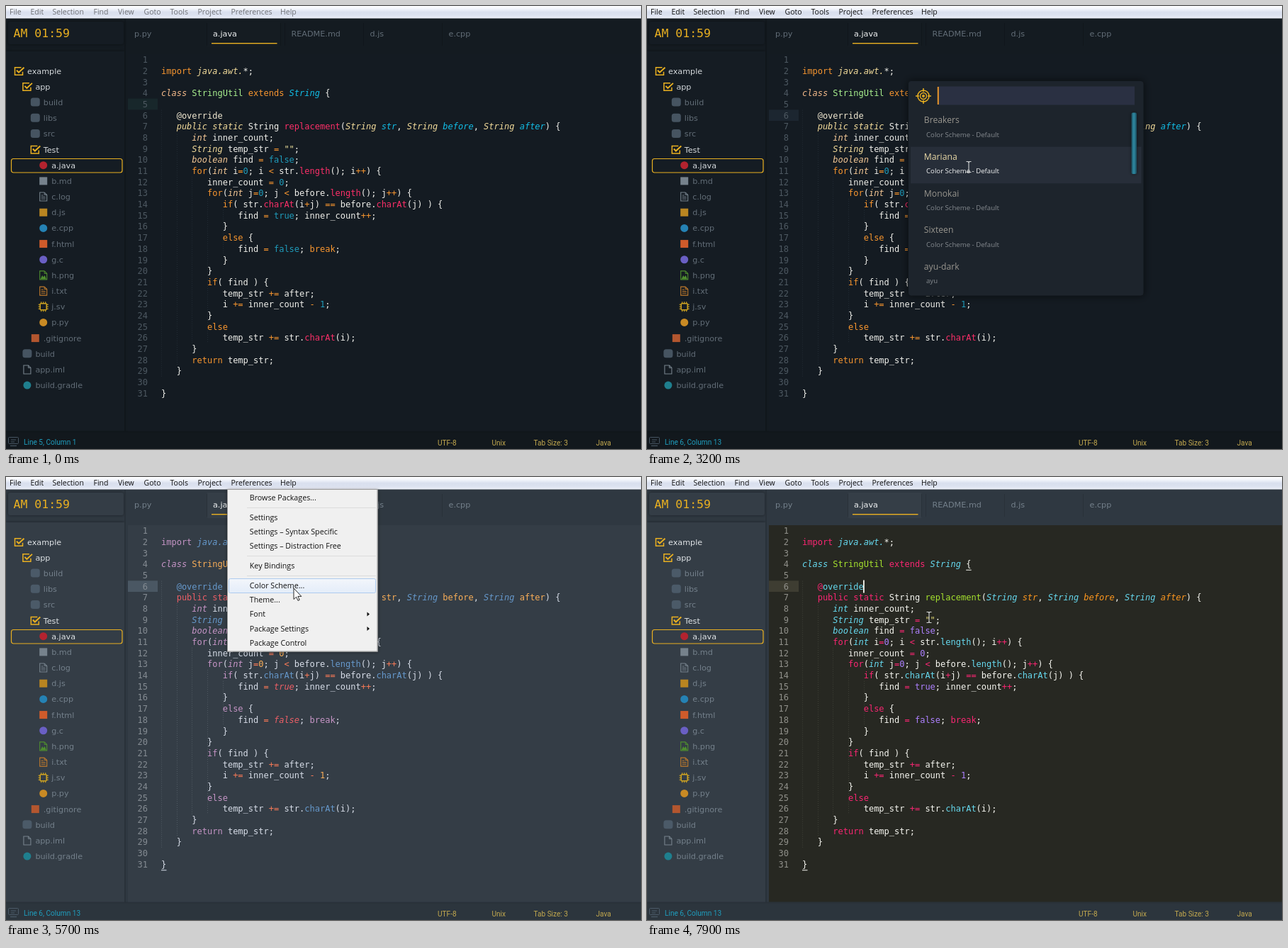
An HTML page with a canvas for the animation above (8 s loop, 896x625 px).

```html
<!DOCTYPE html>
<html lang="en">
<head>
<meta charset="utf-8">
<title>Editor colour schemes</title>
<style>
html, body { margin: 0; width: 100%; height: 100%; overflow: hidden; background: #141b22; }
canvas { display: block; width: 896px; height: 625px; }
</style>
</head>
<body>
<canvas id="stage" width="896" height="625"></canvas>
<script>
const ctx = document.getElementById('stage').getContext('2d');
const LOOP = 8000, STEP = 100;
const GOLD = '#e9b021';
const UI = '"DejaVu Sans", sans-serif';
const MONO = '"DejaVu Sans Mono", monospace';
const MENU = '"Open Sans", "Noto Sans", sans-serif';
const STATUS = 'Roboto, sans-serif';

// Chrome colours
const DARK = {
  bar: '#141b21', side: '#151c23', edge: '#10161b', tab: '#151c22', status: '#12181d',
  label: '#626d77', open: '#d5d9dc', folder: '#465461',
  panel: '#1d242c', input: '#2a3042', row: '#272e39', title: '#98958e', sub: '#858a8f', pick: '#ead9a6',
  thumb: ['#1b4757', '#2f8ca5', '#1b4a5b']
};
const SLATE = {
  bar: '#2f3841', side: '#343d46', edge: '#293139', tab: '#353e47', status: '#2c353d',
  label: '#74808b', open: '#dfe3e6', folder: '#4b5a68',
  panel: '#424c56', input: '#272f37', row: '#566473', title: '#a8a59e', sub: '#959da4', pick: '#f3cc93',
  thumb: ['#1d5560', '#217b86', '#1c3b45']
};

// Code colours; a leading "i" means italic
const GUNA = {
  bg: '#141b22', line: '#1c2630', num: '#4d5861', caret: '#e9b021', guide: '#232c35',
  w: '#f1f1ec', k: '#f8962f', p: 'i#f3dc9b', c: 'i#f3b98a', n: '#a9f08f', T: 'i#12bde6',
  a: '#f1e9d2', A: '#f1e9d2', m: 'i#f3dc9b', t: 'i#f3c795', s: 'i#f3dc9b', r: '#fb2f68',
  v: 'i#12bde6', f: '#fb2f68', o: '#f8962f', d: '#1f9cbb', b: '#1f9cbb', q: '#f0e29c'
};
const MARIANA = {
  bg: '#343d46', line: '#4a5763', num: '#848b92', caret: '#f9ae58', guide: '#505a63',
  w: '#d8dee9', k: '#c695c6', p: 'i#6699cc', c: 'i#c695c6', n: '#f9ae58', T: 'i#6699cc',
  a: '#6699cc', A: '#6699cc', m: '#ec5f66', t: 'i#c695c6', s: 'i#6699cc', r: '#5fb4b4',
  v: '#f9ae58', f: '#6699cc', o: '#f97b58', d: '#f9ae58', b: 'i#ec5f66', q: '#5fb4b4'
};
const MONOKAI = {
  bg: '#272822', line: '#3e3d32', num: '#90908a', caret: '#f8f8f0', guide: '#3f4038',
  w: '#f8f8f2', k: '#f92672', p: 'i#66d9ef', c: 'i#66d9ef', n: '#a6e22e', T: 'i#66d9ef',
  a: '#f92672', A: '#66d9ef', m: '#f92672', t: 'i#66d9ef', s: 'i#66d9ef', r: '#a6e22e',
  v: 'i#fd971f', f: '#66d9ef', o: '#f92672', d: '#ae81ff', b: '#ae81ff', q: '#e6db74'
};

// [x text] marks a token of class x
const CODE = `
[k import] [p java.awt.]*;

[c class] [n StringUtil] [k extends] [T String] {

   [a @][A override]
   [m public static] String [r replacement]([s String] [v str], [s String] [v before], [s String] [v after]) {
      [t int] inner_count;
      [s String] temp_str = [q ""];
      [t boolean] find = [b false];
      [k for]([t int] i=0; i < str.[f length](); i++) {
         inner_count = 0;
         [k for]([t int] j=0; j < before.[f length](); j++) {
            [k if]( str.[f charAt](i+j) == before.[f charAt](j) ) {
               find = [b true]; inner_count++;
            }
            [k else] {
               find = [b false]; [k break];
            }
         }
         [k if]( find ) {
            temp_str += after;
            i += inner_count - 1;
         }
         [k else]
            temp_str += str.[f charAt](i);
      }
      [k return] temp_str;
   }

}`.split('\n').map(tokens);

function tokens(line) {
  const out = [];
  for (const m of line.matchAll(/\[(\w) ([^\]]+)\]|[^\[]+/g)) {
    if (m[1]) { out.push([m[1], m[2]]); continue; }
    for (const [part] of m[0].matchAll(/[=<+\-]+|\d+|[^=<+\-\d]+/g))
      out.push([/[=<+\-]/.test(part) ? 'o' : /\d/.test(part) ? 'd' : 'w', part]);
  }
  return out;
}

const TREE = [
  ['example', 0, 'check'], ['app', 1, 'check'], ['build', 2, 'folder'], ['libs', 2, 'folder'],
  ['src', 2, 'folder'], ['Test', 2, 'check'], ['a.java', 3, 'dot', '#b3232f'],
  ['b.md', 3, 'box', '#76828c'], ['c.log', 3, 'doc', '#76828c'], ['d.js', 3, 'box', '#b98521'],
  ['e.cpp', 3, 'dot', '#2582b4'], ['f.html', 3, 'box', '#cf5b2b'], ['g.c', 3, 'dot', '#6a5fc4'],
  ['h.png', 3, 'image', '#4f8f2f'], ['i.txt', 3, 'doc', '#c07a2c'], ['j.sv', 3, 'chip', '#d1a521'],
  ['p.py', 3, 'dot', '#c98a24'], ['.gitignore', 2, 'box', '#b3562f'], ['build', 1, 'folder'],
  ['app.iml', 1, 'page', '#76828c'], ['build.gradle', 1, 'dot', '#1f7f8e']
];
const TABS = [['p.py', 181], ['a.java', 292], ['README.md', 402.5], ['d.js', 513.5], ['e.cpp', 624.5]];
const BAR = [['File', 5], ['Edit', 34.5], ['Selection', 65.5], ['Find', 123.5], ['View', 158],
  ['Goto', 194.5], ['Tools', 231.5], ['Project', 270.5], ['Preferences', 317.5], ['Help', 387]];
const ITEMS = [['Browse Packages...', 29.5], ['Settings', 57], ['Settings – Syntax Specific', 77],
  ['Settings – Distraction Free', 97.5], ['Key Bindings', 125.5], ['Color Scheme...', 153],
  ['Theme...', 173], ['Font', 193.5], ['Package Settings', 214], ['Package Control', 234]];
const DEF = 'Color Scheme - Default';
const LIST = [['Breakers', DEF], ['Mariana', DEF], ['Monokai', DEF], ['Sixteen', DEF],
  ['ayu-dark', 'ayu'], ['ayu-light', 'ayu'], ['ayu-mirage', 'ayu'], ['Guna', 'Guna/themes']];

// Pointer stops: time, x, y, shape
const PATH = [
  [200, 812, 154, 'beam'], [400, 812, 154, 'beam'], [900, 367, 6, 'arrow'], [1200, 367, 6, 'arrow'],
  [1700, 404, 156, 'arrow'], [2000, 404, 156, 'arrow'], [2200, 393, 170, 'arrow'], [2400, 393, 170, 'arrow'],
  [2700, 440, 215, 'beam'], [3100, 454, 227, 'beam'], [3700, 454, 227, 'beam'], [4100, 406, 157, 'beam'],
  [4300, 406, 157, 'beam'], [4800, 367, 6, 'arrow'], [5100, 367, 6, 'arrow'], [5600, 406, 157, 'arrow'],
  [6000, 406, 157, 'arrow'], [6300, 465, 278, 'beam'], [6600, 465, 284, 'beam'], [7600, 465, 284, 'beam'],
  [7900, 398, 198, 'beam']
];

const clamp = v => Math.max(0, Math.min(1, v));
const ease = v => v * v * (3 - 2 * v);
const within = (t, a, b) => t >= a && t < b;

function rect(x, y, w, h, color) { ctx.fillStyle = color; ctx.fillRect(x, y, w, h); }
function round(x, y, w, h, r, fill, stroke, lw = 1) {
  ctx.beginPath();
  ctx.roundRect(x, y, w, h, r);
  if (fill) { ctx.fillStyle = fill; ctx.fill(); }
  if (stroke) { ctx.strokeStyle = stroke; ctx.lineWidth = lw; ctx.stroke(); }
}
function path(points, color, lw) {
  ctx.beginPath();
  points.forEach(([x, y]) => ctx.lineTo(x, y));
  ctx.strokeStyle = color; ctx.lineWidth = lw; ctx.stroke();
}
function ring(x, y, r, color, lw) {
  ctx.beginPath(); ctx.arc(x, y, r, 0, 7);
  ctx.strokeStyle = color; ctx.lineWidth = lw; ctx.stroke();
}
function text(s, x, y, font, color) {
  ctx.font = font; ctx.fillStyle = color; ctx.fillText(s, x, y);
}
function gradient(x0, y0, x1, y1, colors) {
  const g = ctx.createLinearGradient(x0, y0, x1, y1);
  colors.forEach((c, i) => g.addColorStop(i / (colors.length - 1), c));
  return g;
}
function shadow(blur, color) { ctx.shadowBlur = blur; ctx.shadowColor = color; }
function noShadow() { shadow(0, 'transparent'); }

const icons = {
  check(x, y) {
    path([[x + 3, y - 5], [x - 6, y - 5], [x - 6, y + 5.5], [x + 5, y + 5.5], [x + 5, y + 1]], GOLD, 1.5);
    path([[x - 3.5, y - 1], [x - .5, y + 2], [x + 7, y - 5]], GOLD, 2);
  },
  folder(x, y, c, th) { round(x - 6.5, y - 6.5, 13, 12, 3.5, th.folder); },
  dot(x, y, c) { ctx.beginPath(); ctx.arc(x, y, 5.5, 0, 7); ctx.fillStyle = c; ctx.fill(); },
  box(x, y, c) { rect(x - 5.5, y - 5.5, 11, 11, c); },
  page(x, y, c) {
    path([[x + 1.5, y - 6], [x - 5, y - 6], [x - 5, y + 6], [x + 5, y + 6], [x + 5, y - 2.5], [x + 1.5, y - 6]], c, 1.1);
    path([[x + 1.5, y - 6], [x + 1.5, y - 2.5], [x + 5, y - 2.5]], c, 1);
  },
  doc(x, y, c) {
    icons.page(x, y, c);
    [-2, .5, 3].forEach((d, i) => path([[x - 3, y + d], [x + (i ? 3 : 0), y + d]], c, 1));
  },
  image(x, y, c) {
    icons.page(x, y, c);
    ctx.beginPath();
    [[-4, 5], [-1.5, 0], [0, 2.5], [2, 0], [4, 5]].forEach(([a, b]) => ctx.lineTo(x + a, y + b));
    ctx.fillStyle = c; ctx.fill();
  },
  chip(x, y, c) {
    round(x - 4.5, y - 4.5, 9, 9, 1, null, c, 1.5);
    for (const d of [-3, 0, 3]) for (const s of [-1, 1]) {
      path([[x + d, y + s * 5], [x + d, y + s * 7]], c, 1.2);
      path([[x + s * 5, y + d], [x + s * 7, y + d]], c, 1.2);
    }
  }
};

function chrome(th, s) {
  rect(0, 0, 896, 625, th.bar);
  // tab strip
  rect(172, 18, 724, 40, th.bar);
  rect(284, 22, 103, 36, th.tab);
  [283, 387, 393, 504, 615].forEach(x => rect(x, 24, 1, 32, th.edge));
  TABS.forEach(([name, x], i) => text(name, x, 42.5, '11.2px ' + UI, i === 1 ? '#f0f2f3' : th.label));
  rect(290, 52, 92.5, 1.4, GOLD);
  // clock
  shadow(4, 'rgba(0,0,0,.45)');
  round(3, 22, 163, 32, 3, th.side);
  // side bar
  rect(0, 64, 167, 536, th.side);
  noShadow();
  rect(167, 18, 2, 582, th.edge);
  rect(169, 58, 3, 542, th.bar);
  text('AM 01:59', 10.5, 43.5, '16.5px ' + MONO, GOLD);
  TREE.forEach(([name, depth, icon, color], i) => {
    const y = 91.7 + i * 22.17, x = 30 + depth * 11.4;
    const bright = icon === 'check' || name === 'a.java';
    icons[icon](x - 11.5, y, color, th);
    text(name, x, y + 4, '11.2px ' + UI, bright ? th.open : th.label);
  });
  round(7.5, 215.5, 156.5, 19.5, 3, null, GOLD, 1.2);
  // status bar
  rect(0, 600, 896, 25, th.status);
  rect(0, 599.5, 896, 2, th.edge);
  round(3.5, 608.5, 14, 9, 1, null, th.folder);
  path([[7, 612], [14, 612]], th.folder, 1);
  path([[7, 615], [12, 615]], th.folder, 1);
  path([[6, 620.5], [15, 620.5]], th.folder, 1.2);
  text(s.clicked ? 'Line 6, Column 13' : 'Line 5, Column 1', 25, 618.5, '10.1px ' + STATUS, '#1f9dbd');
  [['UTF-8', 609], ['Unix', 685.5], ['Tab Size: 3', 744.5], ['Java', 832.5]]
    .forEach(([label, x]) => text(label, x, 619.5, '10.1px ' + STATUS, '#c3a94f'));
}

const CW = 7.224, LH = 15.685, LEFT = 219;
const base = n => 80.2 + (n - 1) * LH;

function editor(sc, s) {
  rect(172, 68, 724, 531.5, sc.bg);
  const cur = s.clicked ? 6 : 5;
  rect(172, base(cur) - 12.3, 42, LH, s.clicked ? sc.line : '#18272b');
  // indent guides
  ctx.setLineDash([1, 2]);
  for (let d = 0; d < 5; d++) {
    const [a, b] = [[6, 29], [8, 28], [12, 26], [14, 26], [15, 18]][d];
    const x = Math.round(LEFT + d * 3 * CW) + .5;
    path([[x, base(a) - 12], [x, base(b) + 3.5]], sc.guide, 1);
  }
  ctx.setLineDash([]);
  CODE.forEach((line, i) => {
    const y = base(i + 1), n = String(i + 1);
    text(n, 200 - n.length * CW, y, '12px ' + MONO, sc.num);
    let x = LEFT;
    for (const [kind, str] of line) {
      const style = sc[kind], it = style[0] === 'i';
      text(str, x, y, (it ? 'italic ' : '') + '12px ' + MONO, it ? style.slice(1) : style);
      x += str.length * CW;
    }
  });
  if (s.clicked && !s.panel) {
    rect(LEFT + 32 * CW, base(4) + 3.5, 7.5, 1, sc.w);
    rect(LEFT, base(31) + 3.5, 7.5, 1, sc.w);
  }
  if (s.caret > 0) {
    ctx.globalAlpha = s.caret;
    rect(305, 145.5, 1.8, 18, sc.caret);
    ctx.globalAlpha = 1;
  }
}

function menuBar(s) {
  rect(0, 0, 896, 17.5, gradient(0, 0, 0, 17.5, ['#ffffff', '#f0f3fa', '#d9dfee', '#dce2f0', '#eceff7']));
  if (s.hover) round(312, .5, 67, 15.5, 2, gradient(0, 0, 0, 16, ['#eef0f5', '#c9cfdb']), '#7e8590');
  BAR.forEach(([name, x]) => text(name, x, 12, '10.5px ' + MENU, s.focus ? '#111' : '#6e7075'));
}

function menuPick(bg, border) {
  round(314.5, 143.5, 207, 20, 2, bg, border);
}

function menu(s) {
  if (!s.menu) return;
  ctx.globalAlpha = s.menu;
  shadow(4, 'rgba(0,0,0,.5)');
  rect(312, 17.5, 212.5, 229, '#f0f0f0');
  noShadow();
  ctx.strokeStyle = '#9a9a9a'; ctx.lineWidth = 1;
  ctx.strokeRect(312.5, 17.5, 211.5, 228.5);
  [43, 111, 139].forEach(y => rect(340, y, 182, 1, '#dcdcdc'));
  if (s.pick) menuPick(gradient(0, 143, 0, 163, ['#f3f6fb', '#e4edf9']), '#aecbee');
  for (const [name, y] of ITEMS) text(name, 343.8, y + 3.8, '10.7px ' + MENU, '#111');
  for (const y of [193.5, 214]) {
    ctx.beginPath();
    ctx.moveTo(509.5, y - 3); ctx.lineTo(513, y); ctx.lineTo(509.5, y + 3);
    ctx.fillStyle = '#111'; ctx.fill();
  }
  ctx.globalAlpha = 1;
}

function panel(th, s) {
  if (!s.panel) return;
  const ROW = 51.65, TOP = 147;
  shadow(12, 'rgba(0,0,0,.6)');
  round(368.5, 105.5, 332.5, 303.5, 4, th.panel);
  noShadow();
  round(368.5, 105.5, 332.5, 303.5, 4, null, th.edge);
  ring(390, 127, 8, GOLD, 1.5);
  ring(390, 127, 4.5, GOLD, 1.4);
  ring(390, 127, 1.2, GOLD, 1.5);
  for (const [a, b] of [[1, 0], [-1, 0], [0, 1], [0, -1]])
    path([[390 + a * 6, 127 + b * 6], [390 + a * 11, 127 + b * 11]], GOLD, 1.5);
  rect(411, 113.5, 277, 26, th.input);
  rect(409.8, 114, 2, 25, '#e8962b');
  ctx.save();
  ctx.beginPath(); ctx.rect(370, TOP, 329, 258.3); ctx.clip();
  LIST.forEach(([name, sub], i) => {
    const y = TOP + (i - s.scroll) * ROW, on = i === s.row;
    if (on) rect(372, y, 325.5, ROW, th.row);
    text(name, 390.8, y + 18.2, '12.2px ' + MENU, on ? th.pick : th.title);
    text(sub, 394, y + 37.7, '9.65px ' + MENU, on ? '#f4f5f5' : th.sub);
  });
  ctx.restore();
  const ty = 150.5 + s.scroll * 18.2;
  shadow(5, 'rgba(0,0,0,.5)');
  round(683.5, ty, 7.5, 86.5, 2, gradient(683, 0, 691, 0, th.thumb));
  noShadow();
}

function fadingItem(a) {
  if (a <= 0) return;
  ctx.globalAlpha = a;
  menuPick('#f0f0f0', '#d5dae2');
  text('Color Scheme...', 343.8, 156.8, '10.7px ' + MENU, '#000');
  ctx.globalAlpha = 1;
}

function pointer(t) {
  if (t < PATH[0][0]) return;
  let i = PATH.findIndex(p => p[0] > t);
  if (i < 0) i = PATH.length;
  const a = PATH[i - 1], b = PATH[i] || a;
  const k = b === a ? 0 : ease((t - a[0]) / (b[0] - a[0]));
  const x = a[1] + (b[1] - a[1]) * k, y = a[2] + (b[2] - a[2]) * k;
  if ((k > .5 ? b : a)[3] === 'arrow') {
    ctx.beginPath();
    [[0, 0], [0, 15.5], [3.6, 12.2], [6, 17.4], [8.2, 16.4], [5.9, 11.4], [10.8, 11.4]]
      .forEach(([dx, dy]) => ctx.lineTo(x + dx, y + dy));
    ctx.closePath();
    ctx.fillStyle = '#fff'; ctx.fill();
    ctx.strokeStyle = '#111'; ctx.lineWidth = .9; ctx.stroke();
  } else {
    const c = '#d6d8d8';
    path([[x, y - 7], [x, y + 7]], c, 1.1);
    for (const s of [-1, 1]) {
      path([[x - 3.5, y + s * 7.5], [x - 1, y + s * 7.5], [x, y + s * 6.5],
        [x + 1, y + s * 7.5], [x + 3.5, y + s * 7.5]], c, 1.1);
    }
  }
}

// Blink with soft edges, counted from the moment the editor gains focus
function blink(age) {
  const p = age % 800;
  return p < 300 ? 1 : p < 400 ? .5 : p < 700 ? 0 : .5;
}

function state(t) {
  const first = within(t, 2100, 3300), second = within(t, 5900, 7000);
  const s = {
    focus: t >= 100,
    clicked: t >= 400,
    hover: within(t, 900, 1400) || within(t, 4800, 5300),
    menu: within(t, 1000, 2000) ? clamp((t - 1000) / 200) : within(t, 5000, 5800) ? clamp((t - 5000) / 200) : 0,
    pick: within(t, 1700, 2000) || t >= 5600,
    panel: first || second,
    scroll: first ? 3 * (1 - ease(clamp((t - 2400) / 300))) : 0,
    row: first ? (t < 2700 ? 7 : 1) : (t < 6200 ? 1 : 2),
    fade: within(t, 2000, 2300) ? (2260 - t) / 260 : within(t, 5800, 6100) ? (6060 - t) / 260 : 0,
    caret: 0
  };
  const start = t >= 7000 ? 7000 : t >= 3300 ? 3300 : 400;
  if (s.clicked && !s.panel && !s.menu) s.caret = blink(t - start);
  return s;
}

function draw(t) {
  const s = state(t);
  const th = t < 4300 ? DARK : SLATE;
  const sc = t < 3300 ? GUNA : t < 7000 ? MARIANA : MONOKAI;
  chrome(th, s);
  editor(sc, s);
  panel(th, s);
  menuBar(s);
  menu(s);
  fadingItem(s.fade);
  pointer(t);
}

let last = -1;
const begin = performance.now();
function tick() {
  const t = Math.floor((performance.now() - begin) % LOOP / STEP) * STEP;
  if (t !== last) draw(last = t);
  requestAnimationFrame(tick);
}
tick();
</script>
</body>
</html>
```
